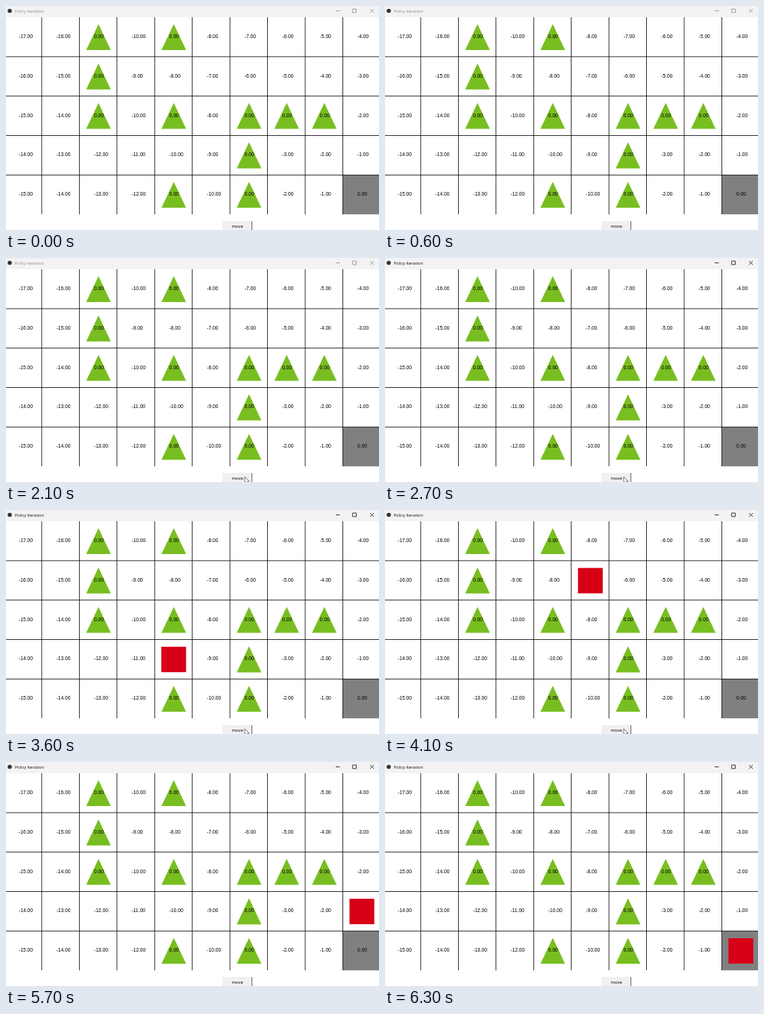
An HTML page with a canvas for the animation above (6400 ms loop, 500x300 px).

```html
<!DOCTYPE html>
<html lang="en">
<head>
<meta charset="utf-8">
<title>Policy Iteration</title>
<style>
html, body { margin: 0; width: 500px; height: 300px; overflow: hidden; background: #fff; }
canvas { display: block; }
</style>
</head>
<body>
<canvas id="stage" width="500" height="300"></canvas>
<script>
const ctx = document.getElementById('stage').getContext('2d');
const LOOP = 6400, TICK = 100, ACTIVE_AT = 2600;
const CELL_W = 50.45, CELL_H = 52.8;

// Obstacles (#) and the goal (G).
const maze = [
  '..#.#.....',
  '..#.......',
  '..#.#.###.',
  '......#...',
  '....#.#..G'
];

const cellAt = (col, row) => (maze[row] || '')[col] || '#';
const neighbours = ([col, row]) =>
  [[col + 1, row], [col, row - 1], [col, row + 1], [col - 1, row]]
    .filter(([c, r]) => cellAt(c, r) !== '#');

// Breadth-first distances from the goal.
const goal = [9, 4];
const distance = { [goal]: 0 };
const queue = [goal];
for (const cell of queue) {
  for (const next of neighbours(cell)) {
    if (next in distance) continue;
    distance[next] = distance[cell] + 1;
    queue.push(next);
  }
}

// The agent always steps to a cell nearer the goal.
const path = [[2, 3]];
while (distance[path.at(-1)] > 0) {
  const here = path.at(-1);
  path.push(neighbours(here).find(next => distance[next] < distance[here]));
}

// Each redraw takes a little longer than the one before.
const arrival = k => 2896 + 229 * k + 2 * k * k;

// Pointer keys: time, x, y of the tip.
const pointer = [[1100, 324, 302], [1200, 322, 298.5], [1700, 322, 298.5],
  [2000, 320, 293], [4700, 320, 293], [5100, 333, 295], [5400, 340, 303]];

function rect(x, y, w, h, color) {
  ctx.fillStyle = color;
  ctx.fillRect(x, y, w, h);
}

function polygon(points, color) {
  ctx.beginPath();
  points.forEach(([x, y]) => ctx.lineTo(x, y));
  ctx.closePath();
  ctx.fillStyle = color;
  ctx.fill();
}

function label(text, x, y, font, color) {
  ctx.font = font;
  ctx.fillStyle = color;
  ctx.fillText(text, x, y);
}

function drawTitleBar(active) {
  const ink = active ? '#111' : '#8c8c8c';
  rect(0, 0, 500, 15, '#f3f3f3');
  ctx.beginPath();
  ctx.arc(5, 6.5, 2.8, 0, Math.PI * 2);
  ctx.fillStyle = '#333';
  ctx.fill();
  label('Policy Iteration', 11.7, 9, '5.7px "Open Sans", sans-serif', ink);

  ctx.strokeStyle = ink;
  ctx.lineWidth = 0.8;
  ctx.beginPath();
  ctx.moveTo(442, 6.5);
  ctx.lineTo(447.5, 6.5);
  ctx.rect(464.7, 4, 4.8, 4.8);
  ctx.moveTo(488, 4);
  ctx.lineTo(493, 9);
  ctx.moveTo(493, 4);
  ctx.lineTo(488, 9);
  ctx.stroke();
}

function drawCell(col, row, hasAgent) {
  const x = 23.1 + col * CELL_W, y = 25 + row * CELL_H;
  const kind = cellAt(col, row);
  if (kind === 'G') rect(451.7, 226.3, 48.3, 52.7, '#808080');
  if (hasAgent) {
    rect(x - 16.7, y - 0.2, 33.2, 34, '#d70017');
    return;
  }
  if (kind === '#') {
    polygon([[x, y - 0.8], [x + 16.5, y + 34], [x - 16.5, y + 34]], '#78be20');
  }
  const steps = distance[[col, row]] || 0;
  label((steps ? '-' : '') + steps.toFixed(2), 17 + col * CELL_W, 43 + row * CELL_H,
    '6.7px "Liberation Sans", Arial, sans-serif', '#000');
}

function drawGrid() {
  for (let i = 0; i < 9; i++) rect(47.5 + i * CELL_W, 15, 0.8, 264, '#000');
  for (let i = 0; i < 4; i++) rect(0, 67.5 + i * CELL_H, 500, 0.8, '#000');
}

function drawButton() {
  rect(290, 288, 40, 12, '#f0f0f0');
  rect(329.2, 288, 0.9, 12, '#555');
  label('move', 302.5, 297, '6px "Open Sans", sans-serif', '#000');
}

function drawPointer(t) {
  const next = pointer.findIndex(key => key[0] > t);
  if (next < 1) return;
  const [t0, x0, y0] = pointer[next - 1], [t1, x1, y1] = pointer[next];
  const k = (t - t0) / (t1 - t0);
  const x = x0 + (x1 - x0) * k, y = y0 + (y1 - y0) * k;
  const shape = [[0, 0], [0, 8.5], [2, 6.8], [3.3, 9.8], [4.6, 9.2], [3.4, 6.3], [6, 6.1]];
  polygon(shape.map(([dx, dy]) => [x + dx, y + dy]), '#fff');
  ctx.strokeStyle = '#222';
  ctx.lineWidth = 0.6;
  ctx.stroke();
}

function draw(t) {
  rect(0, 0, 500, 300, '#fff');
  drawTitleBar(t >= ACTIVE_AT);
  const agent = String(path.filter((_, k) => arrival(k) <= t).at(-1));
  for (let row = 0; row < 5; row++) {
    for (let col = 0; col < 10; col++) drawCell(col, row, agent === `${col},${row}`);
  }
  drawGrid();
  drawButton();
  drawPointer(t);
}

const start = performance.now();
function frame() {
  const t = (performance.now() - start) % LOOP;
  draw(Math.floor(t / TICK) * TICK);
  requestAnimationFrame(frame);
}
frame();
</script>
</body>
</html>
```
